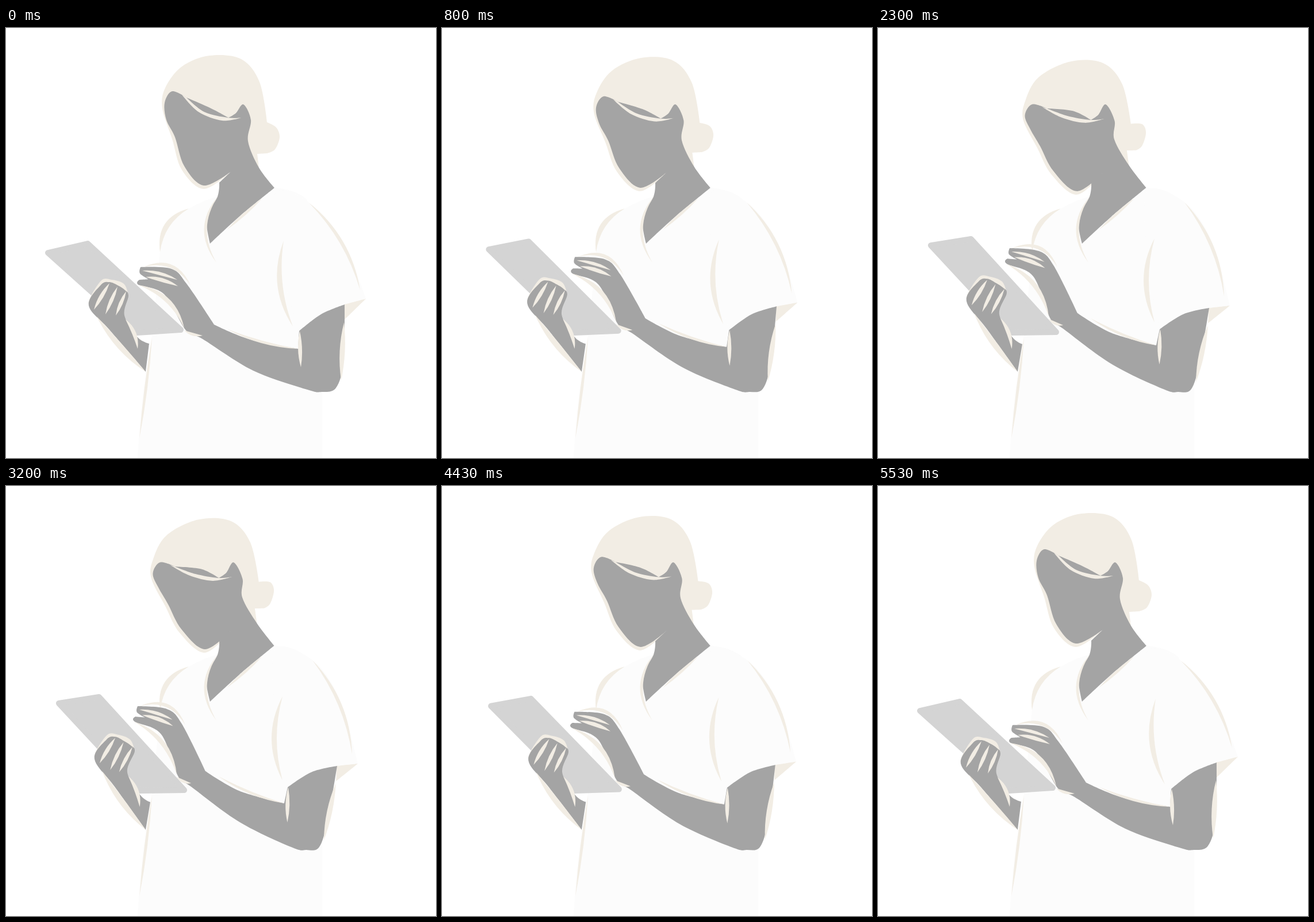
An HTML page for the animation above (5.61 s loop, 748 px wide and 748 px high).

```html
<!DOCTYPE html>
<html lang="en">
<head>
<meta charset="utf-8">
<title>Nurse with tablet</title>
<style>
html, body { margin: 0; width: 100%; height: 100%; overflow: hidden; background: #fff; }
svg { display: block; width: 100vw; height: 100vh; }
.shirt { fill: #fcfcfc; }
.cream { fill: #f2ede4; }
.skin { fill: #a4a4a4; }
.tablet { fill: #d4d4d4; stroke: #d4d4d4; stroke-width: 10; stroke-linejoin: round; }
</style>
</head>
<body>
<svg id="stage" viewBox="0 0 748 748"></svg>
<script>
const stage = document.getElementById('stage');
const LOOP = 5610, LAST = 111;
const parts = [];

// Cubic Bezier easing, solved for x by bisection
function bezier(x1, y1, x2, y2) {
  const at = (a, b, s) => 3 * a * s * (1 - s) ** 2 + 3 * b * s * s * (1 - s) + s ** 3;
  return x => {
    let lo = 0, hi = 1;
    for (let i = 0; i < 24; i++) {
      const mid = (lo + hi) / 2;
      if (at(x1, x2, mid) < x) lo = mid; else hi = mid;
    }
    return at(y1, y2, lo);
  };
}

// A rig bends points by pins "x y dx dy", weighted by nearness
function rig(ease, text) {
  const pins = text.split(',').map(pin => pin.trim().split(' ').map(Number));
  const shift = (x, y) => {
    let sum = 0, sx = 0, sy = 0;
    for (const [px, py, dx, dy] of pins) {
      const w = 1 / (Math.hypot(x - px, y - py) + .5) ** 3;
      sum += w; sx += w * dx; sy += w * dy;
    }
    return [sx / sum, sy / sum];
  };
  return { ease, shift };
}

const head = rig(bezier(.25, 0, .35, 1),
  '306 67 -27 19, 395 50 -18 7, 455 140 -17 8, 476 190 -10 -8, 437 225 -4 -6,' +
  '391 250 0 2, 344 277 2 10, 293 190 -12 16, 283 112 -21 23, 413 133 -17 0,' +
  '387 156 -17 4, 421 197 -10 -3, 371 285 0 0, 450 270 0 0, 355 375 0 0');
const hold = rig(bezier(.25, .05, .3, 1),
  '67 391 19 -13, 143 370 20 -8, 311 526 6 4, 229 535 5 0, 166 445 10 -6,' +
  '145 482 10 -8, 211 457 11 -4, 206 500 5 -2, 243 598 0 0, 249 545 2 1, 182 528 9 -2');
const arm = rig(bezier(.2, .1, .25, 1),
  '626 471 -14 12, 588 481 -13 6, 527 304 6 -1, 585 370 -5 0, 510 527 -20 -3,' +
  '508 558 -24 -6, 583 612 -30 3, 548 633 -27 0, 362 516 -15 -20, 313 526 -13 -20,' +
  '342 541 -20 -18, 315 446 -9 -32, 288 415 -8 -31, 234 418 -5 -33, 228 443 -7 -37,' +
  '275 463 -5 -31, 483 370 -2 -4, 473 460 -11 0, 499 519 -18 -7, 430 596 -23 -11');

function add(kind, pts, pose, toPath) {
  const el = document.createElementNS('http://www.w3.org/2000/svg', 'path');
  el.setAttribute('class', kind);
  stage.append(el);
  const shifts = pts.map(([x, y]) => pose ? pose.shift(x, y) : [0, 0]);
  parts.push({ el, pts, shifts, pose, toPath });
}

const xy = p => p[0].toFixed(2) + ' ' + p[1].toFixed(2);

// Closed smooth curve through points; "!" marks a sharp one
function blob(kind, text, pose) {
  const marks = text.split(',').map(s => s.trim());
  const sharp = marks.map(s => s.endsWith('!'));
  const pts = marks.map(s => s.replace('!', '').split(' ').map(Number));
  const n = pts.length;
  add(kind, pts, pose, p => {
    const handle = (i, side) => {
      if (sharp[i]) return p[i];
      const a = p[(i + n - 1) % n], b = p[(i + 1) % n];
      return p[i].map((v, c) => v + side * (b[c] - a[c]) / 6);
    };
    let d = 'M' + xy(p[0]);
    for (let i = 0; i < n; i++) {
      const j = (i + 1) % n;
      d += 'C' + [handle(i, 1), handle(j, -1), p[j]].map(xy).join(' ');
    }
    return d + 'Z';
  });
}

// Sliver between two arcs that share their ends
function leaf(x1, y1, x2, y2, bulge1, bulge2, pose) {
  add('cream', [[x1, y1], [x2, y2]], pose, ([a, b]) => {
    const dx = b[0] - a[0], dy = b[1] - a[1], len = Math.hypot(dx, dy);
    const ctrl = k => xy([(a[0] + b[0]) / 2 + dy / len * k, (a[1] + b[1]) / 2 - dx / len * k]);
    return `M${xy(a)}Q${ctrl(bulge1)} ${xy(b)}Q${ctrl(bulge2)} ${xy(a)}Z`;
  });
}

// Shirt
blob('shirt', '318 314, 370 293, 467 278!, 527 304, 550 420!, 550 748!, 229 748!, 238 640, 254 537, 268 390!, 282 338');
blob('shirt', '467 290, 527 304, 585 370, 626 471!, 588 481!, 548 498, 510 527!, 480 420', arm);
leaf(318, 314, 268, 390, -40, -22);
leaf(254, 537, 232, 714, -4, 6);
leaf(527, 304, 616, 456, 34, 22, arm);
leaf(483, 370, 499, 519, -38, -20, arm);
blob('cream', '626 471!, 588 481!, 588 508!', arm);

// Head and neck
blob('cream', '272 140, 277 104, 306 67, 354 48, 409 54, 441 94, 454 164!, 470 173, 476 190, 468 211, 454 218!, 437 219!, 440 243!, 391 250!, 344 280, 306 247, 289 193', head);
blob('skin', '276 130, 289 110, 314 121!, 355 139, 387 156!, 400 148, 413 133, 426 160, 421 197, 440 243, 467 278!, 407 327, 355 375!, 349 330, 368 293, 371 269!, 391 250!, 344 274, 310 240, 294 190, 279 160', head);
blob('cream', '306 116!, 335 146, 376 161, 409 156!, 386 156, 345 146, 314 121!', head);
leaf(369, 292, 366, 408, -46, -36);
leaf(446, 296, 384, 351, -5, 5);

// Tablet and the hand holding it
blob('tablet', '73 391!, 142 375!, 304 525!, 228 530!', hold);
blob('cream', '144 480, 165 440, 184 438, 205 445, 213 464!, 180 480', hold);
blob('skin', '144 483, 165 447, 180 442, 195 448, 207 456, 213 466, 206 500, 229 538, 249 549!, 243 598!, 180 525', hold);
leaf(153, 490, 180, 444, 8, -6, hold);
leaf(173, 498, 194, 450, 7, -6, hold);
leaf(191, 500, 209, 458, 7, -6, hold);
leaf(158, 502, 243, 598, -18, 2, hold);
leaf(208, 507, 229, 558, 16, 2, hold);

// Tapping arm
blob('skin', '234 416!, 288 419, 315 446, 362 516!, 425 542, 508 558!, 510 527!, 548 498, 589 481!, 587 580, 574 626, 549 633, 524 629, 430 596, 342 541, 313 526, 275 463, 231 447, 232 438!, 248 437!, 233 427', arm);
leaf(238, 416, 321, 448, 44, 32, arm);
leaf(237, 422, 298, 438, 11, 0, arm);
leaf(243, 433, 299, 449, 12, -2, arm);
leaf(230, 447, 310, 522, 38, 22, arm);
leaf(310, 526, 342, 535, 0, -10, arm);
leaf(385, 524, 508, 558, -6, -15, arm);
leaf(511, 527, 513, 590, -8, 6, arm);
leaf(588, 512, 583, 613, -10, 8, arm);

// Steps alternate between 30 and 70 ms; the last pose is held
function draw(now) {
  const t = now % LOOP;
  const step = Math.min(LAST, 2 * Math.floor(t / 100) + (t % 100 >= 30 ? 1 : 0));
  const p = 1 - Math.abs(1 - 2 * step / LAST);
  for (const { el, pts, shifts, pose, toPath } of parts) {
    const k = pose ? pose.ease(p) * 1.015 : 0;
    el.setAttribute('d', toPath(pts.map(([x, y], i) => [x + shifts[i][0] * k, y + shifts[i][1] * k])));
  }
}

const start = performance.now();
function tick() {
  draw(performance.now() - start);
  requestAnimationFrame(tick);
}
tick();
</script>
</body>
</html>
```
